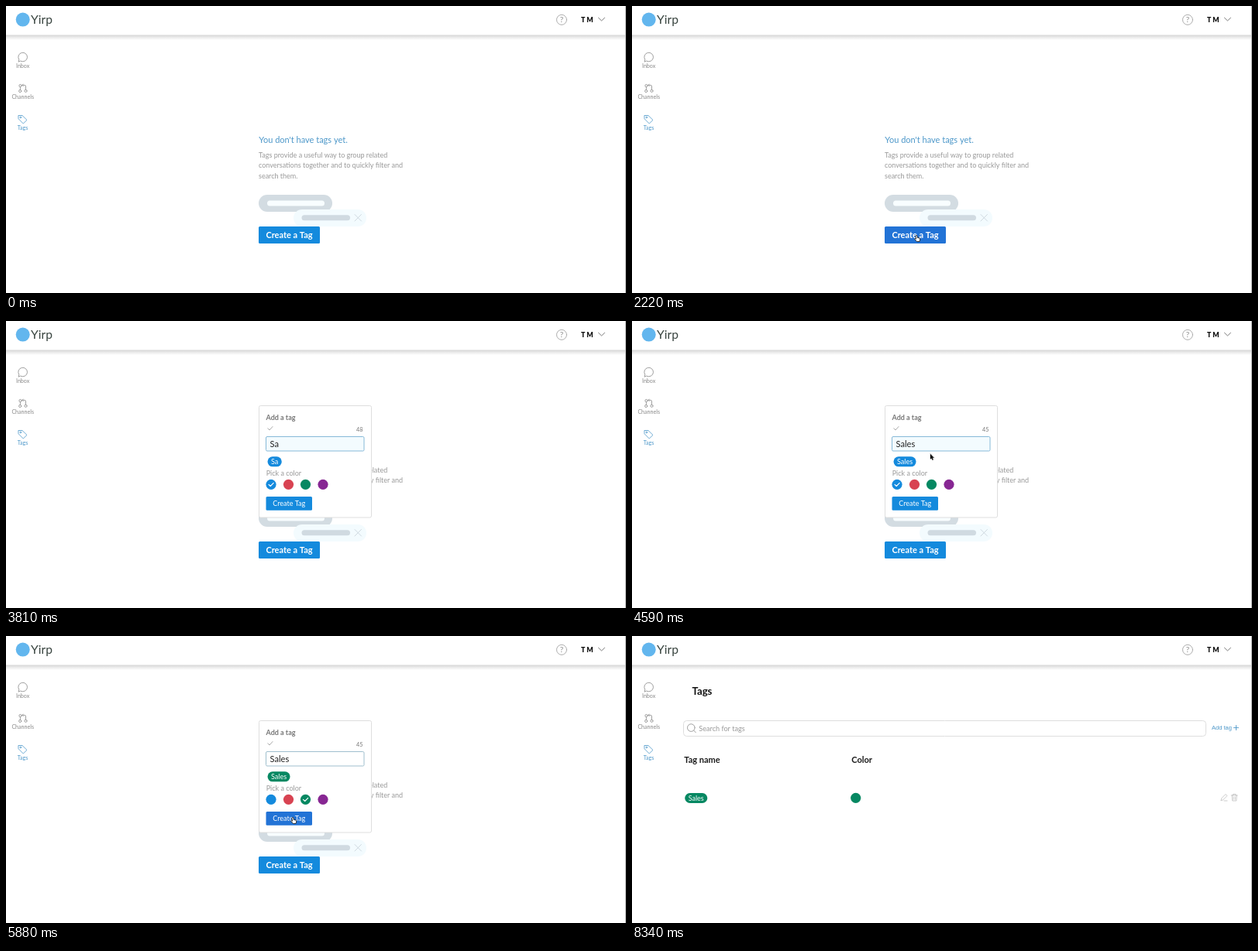
An HTML page with a canvas that plays this animation: 800x371 px, repeating every 8550 ms.

```html
<!DOCTYPE html>
<html lang="en">
<head>
<meta charset="utf-8">
<title>Creating a tag</title>
<style>
html, body { margin: 0; width: 100%; height: 100%; overflow: hidden; background: #fff; }
canvas { display: block; }
</style>
</head>
<body>
<canvas id="stage" width="800" height="371"></canvas>
<script>
const c = document.getElementById('stage').getContext('2d');
const LOOP = 8550;
const BLUE = '#148add', HOVER = '#2273d6', LINK = '#4c97c9', GREEN = '#068862';
const SWATCHES = [[342, BLUE], [364.5, '#d84352'], [386.5, GREEN], [409, '#872793']];

// Moments at which the interface changes
const OPEN = 2580, TYPE = 3540, LETTER = 150, PICK = 5130, DONE = 6240;

// Pointer tip: time, x, y
const PATH = [
  [330, 412, 380], [1050, 372, 300], [1500, 367, 296], [2670, 367, 296],
  [3030, 368, 178], [3300, 376, 157], [4380, 376, 157], [4590, 385, 172],
  [5010, 387, 211], [5220, 387, 211], [5640, 370, 234], [6150, 370, 234],
  [6500, 368.5, 236], [7020, 368.5, 236], [7410, 396, 382]
];

function text(str, x, y, size, color, weight = 400, align = 'left', family = 'Lato, sans-serif') {
  c.font = `${weight} ${size}px ${family}`;
  c.textAlign = align;
  c.fillStyle = color;
  c.fillText(str, x, y);
}

function box(x, y, w, h, r, fill, stroke) {
  c.beginPath();
  c.roundRect(x, y, w, h, r);
  if (fill) { c.fillStyle = fill; c.fill(); }
  if (stroke) { c.strokeStyle = stroke; c.lineWidth = 1; c.stroke(); }
}

function dot(x, y, r, fill) {
  c.beginPath();
  c.arc(x, y, r, 0, 7);
  c.fillStyle = fill;
  c.fill();
}

function line(d, stroke, width = 0.8, fill, x = 0, y = 0) {
  const path = new Path2D(d);
  c.save();
  c.translate(x, y);
  c.lineCap = c.lineJoin = 'round';
  c.strokeStyle = stroke;
  c.lineWidth = width;
  if (fill) { c.fillStyle = fill; c.fill(path); }
  c.stroke(path);
  c.restore();
}

function ring(x, y, r, stroke) {
  line(`M${x + r} ${y}A${r} ${r} 0 1 1 ${x - r} ${y}A${r} ${r} 0 1 1 ${x + r} ${y}`, stroke);
}

function tagPill(str, x, y, color) {
  c.font = '400 9px Lato, sans-serif';
  box(x, y, c.measureText(str).width + 9, 13, 6.5, color);
  text(str, x + 4.5, y + 9.7, 9, '#fff');
}

function pointerAt(t) {
  const next = PATH.findIndex(p => p[0] > t);
  if (next <= 0) return { x: 0, y: 400 };
  const [t0, x0, y0] = PATH[next - 1], [t1, x1, y1] = PATH[next];
  const u = (t - t0) / (t1 - t0), e = u * u * (3 - 2 * u);
  return { x: x0 + (x1 - x0) * e, y: y0 + (y1 - y0) * e };
}

const inside = (p, x, y, w, h) => p.x >= x && p.x <= x + w && p.y >= y && p.y <= y + h;

function drawPointer({ x, y }, kind) {
  if (kind === 'hand') {
    line('M0 1Q1-.5 2 1L2.2 3.5L5 4Q6 4.3 5.7 6L5 8.5H1.5L-1.3 5.3Q-1 4 .3 5Z', '#222', 0.9, '#fff', x - 1, y);
  } else if (kind === 'beam') {
    line('M-1.5-4L0-3.4L1.5-4M0-3.4V3.4M-1.5 4L0 3.4L1.5 4', '#333', 0.8, null, x, y);
  } else {
    line('M0 0V6.5L1.5 5.2L2.6 7.8L3.7 7.3L2.6 4.8H4.6Z', '#fff', 1, null, x, y);
    line('M0 0V6.5L1.5 5.2L2.6 7.8L3.7 7.3L2.6 4.8H4.6Z', '#000', 0.3, '#000', x, y);
  }
}

function drawFrame() {
  const shade = c.createLinearGradient(0, 37, 0, 44);
  shade.addColorStop(0, '#cfcfcf');
  shade.addColorStop(0.35, '#e4e4e4');
  shade.addColorStop(1, '#fff');
  c.fillStyle = shade;
  c.fillRect(0, 37.5, 800, 6.5);

  dot(21.7, 17.6, 9, '#62b6ee');
  text('Yirp', 32, 23, 15.6, '#38443f');
  ring(717, 17.8, 6.5, '#999');
  text('?', 717, 21.3, 10, '#888', 400, 'center');
  text('T M', 742, 20.8, 8.7, '#111', 900);
  line('M764.5 15.2L768.5 19L772.5 15.2', '#777', 1);

  const grey = '#888';
  line('M16.2 71.8L16.8 69.2A5.8 5.8 0 1 1 19 71.2Z', grey);
  text('Inbox', 21.6, 80.3, 7.1, grey, 400, 'center');
  ring(18.5, 103, 1.6, grey);
  ring(18.2, 110, 1.6, grey);
  ring(25.5, 109.8, 1.6, grey);
  line('M18.4 104.8V108.2M21 102.3H23.8Q25.5 102.3 25.5 104V108M22.3 101L21 102.3L22.3 103.6', grey);
  text('Channels', 21.7, 120.3, 7.1, grey, 400, 'center');
  line('M16.3 141.5H21L27 147.4L22.3 152L16.3 146Z', LINK);
  ring(18.8, 144, 0.9, LINK);
  text('Tags', 21.5, 160.3, 7.1, LINK, 400, 'center');
}

function drawEmpty(hover) {
  text("You don't have tags yet.", 326.3, 177.2, 11, LINK);
  ['Tags provide a useful way to group related',
   'conversations together and to quickly filter and',
   'search them.'].forEach((row, i) => text(row, 326, 196 + i * 13.3, 9, '#999'));

  box(326, 244, 95, 22, 11, '#d3dce2');
  box(337, 251.5, 74, 7, 3.5, '#f8fdff');
  box(371, 263, 94, 22, 11, '#f3fbfe');
  box(381.5, 270.3, 62.5, 7, 3.5, '#d0dae1');
  line('M450 269.5L458.5 278M458.5 269.5L450 278', '#d0dae1', 1);

  box(326, 285, 79, 22, 1.5, hover ? HOVER : BLUE);
  text('Create a Tag', 365.5, 300.2, 11, '#fff', 700, 'center');
}

function drawDialog(t, hover) {
  const name = 'Sales'.slice(0, Math.max(0, Math.floor((t - TYPE) / LETTER) + 1));
  const top = name ? 4 : 0, low = name ? 22 : 0;
  const chosen = t < PICK ? 0 : 2, focused = t < PICK;

  box(326.5, 109.5, 145, 122.5 + low, 2, '#fff', '#dedede');
  text('Add a tag', 335.5, 128.3, 9, '#757575', 700);
  text(50 - name.length, 460.5, 138.8 + top, 7.3, '#777', 400, 'right');
  box(335.5, 145.5 + top, 126.5, 18.5, 1.5, focused ? '#f3fbfe' : '#fff', focused ? '#86b9d8' : '#9fbfce');
  text(name || 'Please enter a tag name', 340.5, 158.8 + top, 11.1, name ? '#222' : '#999');
  if (name) {
    line('M337.8 138.8L340 141L344 136.5', '#aaa', 1);
    tagPill(name, 337.5, 175.3, SWATCHES[chosen][1]);
  }
  text('Pick a color', 335.7, 178.4 + low, 9, '#999');
  SWATCHES.forEach(([x, color], i) => {
    dot(x, 189.3 + low, 6.6, color);
    if (i === chosen) line('M-3 0L-.8 2.2L3.2-2', '#fff', 1.1, null, x, 189.3 + low);
  });
  box(335.5, 205 + low, 59.5, 17.7, 1.5, hover ? HOVER : BLUE);
  text('Create Tag', 365.2, 217.3 + low, 9, '#fff', 400, 'center');
}

function drawList() {
  text('Tags', 77.5, 76.3, 13.2, '#111', 700);
  box(66.5, 109.5, 674, 20, 4, '#fff', '#dedede');
  ring(76.3, 118.6, 4.8, '#888');
  line('M79.8 122.2L82.3 124.8', '#888');
  text('Search for tags', 86.3, 122.6, 9.1, '#999');
  text('Add tag', 748, 121.2, 7.5, LINK, 400, 'left', '"Liberation Sans", sans-serif');
  line('M776.5 118.6H782.5M779.5 115.6V121.6', LINK, 0.9);

  text('Tag name', 67.3, 163.7, 11, '#1b1b1b', 700);
  text('Color', 283.3, 163.7, 11, '#1b1b1b', 700);
  tagPill('Sales', 68.2, 203, GREEN);
  dot(288.7, 209.3, 6.6, GREEN);
  line('M760 212.5L761 209.5L766 204.5L768 206.5L763 211.5ZM764 213H768', '#b5b5b5', 0.7);
  line('M773.2 206H781.2M775.5 206V204.5H779V206M774.2 206L774.7 213H779.8L780.3 206M776.2 208V211.3M778.3 208V211.3', '#b5b5b5', 0.7);
}

function draw(t) {
  const p = pointerAt(t), dialog = t >= OPEN && t < DONE, low = t >= TYPE ? 22 : 0;
  const overMain = t < DONE && inside(p, 326, 285, 79, 22);
  const overCreate = dialog && inside(p, 335, 205 + low, 60, 18);
  const overSwatch = dialog && SWATCHES.some(([x]) => Math.hypot(p.x - x, p.y - 189.3 - low) < 6.6);
  const overText = dialog && (inside(p, 335, 145 + low / 5.5, 127, 19) || inside(p, 335, 170 + low, 45, 11));

  c.fillStyle = '#fff';
  c.fillRect(0, 0, 800, 371);
  drawFrame();
  if (t < DONE) drawEmpty(overMain); else drawList();
  if (dialog) drawDialog(t, overCreate);
  c.fillStyle = '#aaa';
  c.fillRect(799, 0, 1, 371);

  // The pointer hides while typing
  const typing = t >= TYPE && t < 4380;
  if (!typing) drawPointer(p, overMain || overCreate || overSwatch ? 'hand' : overText ? 'beam' : 'arrow');
}

function tick() {
  draw(performance.now() % LOOP);
  requestAnimationFrame(tick);
}
tick();
</script>
</body>
</html>
```
